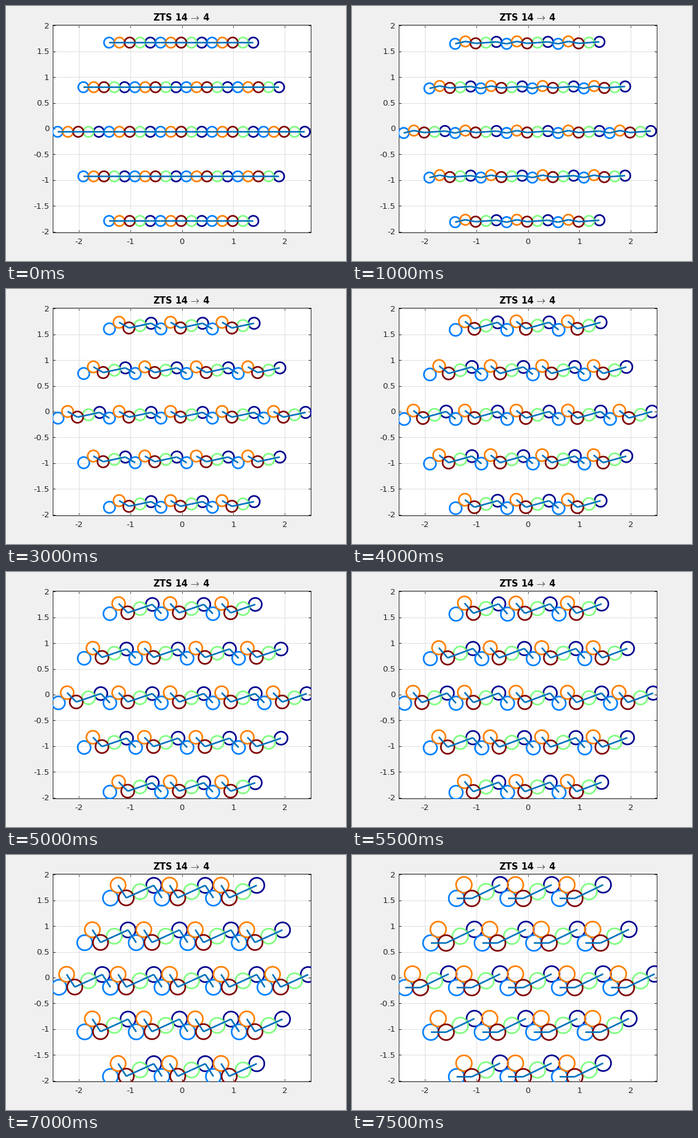
Recreate the animation shown at these times as a matplotlib script. Size 560 px wide and 420 px high, loop 8000 ms.

```python
import numpy as np
import matplotlib.pyplot as plt
from matplotlib.animation import FuncAnimation
from matplotlib.collections import LineCollection
from matplotlib.transforms import Bbox, ScaledTranslation

W, H, DPI = 560, 420, 100
PX = 72 / DPI                                    # one pixel in points
UNIT = 84.8                                      # pixels per data unit
X0, Y0 = 289.6, 202                              # pixel of the data origin
LEFT, RIGHT, TOP, BOTTOM = 77, 502, 31, 373      # axes box in pixels
FRAMES, STEP = 16, 500
INK = "#262626"

plt.rcParams.update({
    "font.family": "DejaVu Sans",
    "mathtext.fontset": "cm",
    "axes.unicode_minus": False,
})

NAVY, BLUE, GREEN, ORANGE, RED = range(5)
COLORS = [(0, 0, 0.5625), (0, 0.5, 1), (0.5, 1, 0.5), (1, 0.5, 0), (0.5, 0, 0)]

# Triangular lattice cut to a hexagon: (column, row, is last in its row)
ROWS = range(2, -3, -1)
CELLS = [(i - (4 - abs(r)) / 2, r * np.sqrt(3) / 2, i == 4 - abs(r))
         for r in ROWS for i in range(5 - abs(r))]
ORIGIN = np.array([0.188, -0.061])

TURN = np.linspace(0, 2 * np.pi, 73)
RING = np.column_stack([np.cos(TURN), np.sin(TURN)])


def rod(length, rise):
    """Vector of the given length and vertical rise."""
    return np.array([np.sqrt(length**2 - rise**2), rise])


def motif(k):
    """Disc diameter and the five disc offsets, symmetric about the green one."""
    d = np.sqrt(0.04 + (1.304 * k / UNIT)**2)
    v = rod(d, (0.575 * k + 0.0115 * k**2) / UNIT)
    w = rod(d, -(1.6 * k - 0.0072 * k**2) / UNIT)
    pos = np.zeros((5, 2))
    pos[NAVY], pos[RED] = v, -v
    pos[ORANGE] = -v - w
    pos[BLUE] = v + w - (1, 0)
    return d, pos


def bonds(k):
    """Touching pairs inside a cell, and whether cells are linked in a row."""
    pairs = [(RED, GREEN), (GREEN, NAVY)]
    if k >= 15:
        return [(BLUE, RED)] + pairs, False
    pairs = [(ORANGE, RED)] + pairs
    if k < 5:
        pairs = [(BLUE, ORANGE)] + pairs
    return pairs, True


fig = plt.figure(figsize=(W / DPI, H / DPI), dpi=DPI, facecolor="#f0f0f0")
ax = fig.add_axes([LEFT / W, 1 - BOTTOM / H,
                   (RIGHT - LEFT) / W, (BOTTOM - TOP) / H])
ax.set(xlim=((LEFT - X0) / UNIT, (RIGHT - X0) / UNIT),
       ylim=((Y0 - BOTTOM) / UNIT, (Y0 - TOP) / UNIT))
xt, yt = np.arange(-2, 3), np.arange(-2, 2.1, 0.5)
ax.set_xticks(xt, [f"{x:g}" for x in xt])
ax.set_yticks(yt, [f"{y:g}" for y in yt])
ax.set_axisbelow(True)
ax.grid(color="#dfdfdf", lw=PX)
ax.tick_params(direction="in", top=True, right=True, length=4.25 * PX,
               width=PX, color=INK, labelcolor=INK, labelsize=13.33 * PX)
ax.tick_params(axis="x", pad=8.5 * PX)
ax.tick_params(axis="y", pad=5.5 * PX)
lift = ScaledTranslation(0, 0.5 / DPI, fig.dpi_scale_trans)
for label in ax.get_yticklabels():
    label.set_transform(label.get_transform() + lift)
for spine in ax.spines.values():
    spine.set(color=INK, linewidth=PX)
fig.text(289.2 / W, 1 - 24 / H, r"ZTS 14$\:\rightarrow\:$4", ha="center",
         va="baseline", weight="bold", size=14.67 * PX, color="black")

discs = LineCollection([], colors=np.repeat(COLORS, len(CELLS), axis=0),
                       linewidths=2.67 * PX, zorder=3)
links = LineCollection([], colors=[(0, 0.447, 0.741)],
                       linewidths=2.67 * PX, zorder=4)
clip = Bbox.from_extents(LEFT, H - BOTTOM - 1, RIGHT + 1, H - TOP)
for coll in (discs, links):
    ax.add_collection(coll, autolim=False)
    coll.set_snap(False)
    coll.set_clip_path(None)
    coll.set_clip_box(clip)


def update(k):
    d, pos = motif(k)
    pairs, linked = bonds(k)
    centers = [ORIGIN + (x, y) for x, y, _ in CELLS]
    discs.set_segments([c + p + RING * d / 2 for p in pos for c in centers])
    segs = []
    for c, (_, _, last) in zip(centers, CELLS):
        segs += [[c + pos[a], c + pos[b]] for a, b in pairs]
        if linked and not last:
            segs.append([c + pos[NAVY], c + pos[BLUE] + (1, 0)])
    links.set_segments(segs)
    return discs, links


anim = FuncAnimation(fig, update, frames=FRAMES, interval=STEP,
                     repeat=True, repeat_delay=0)
plt.show()
```
